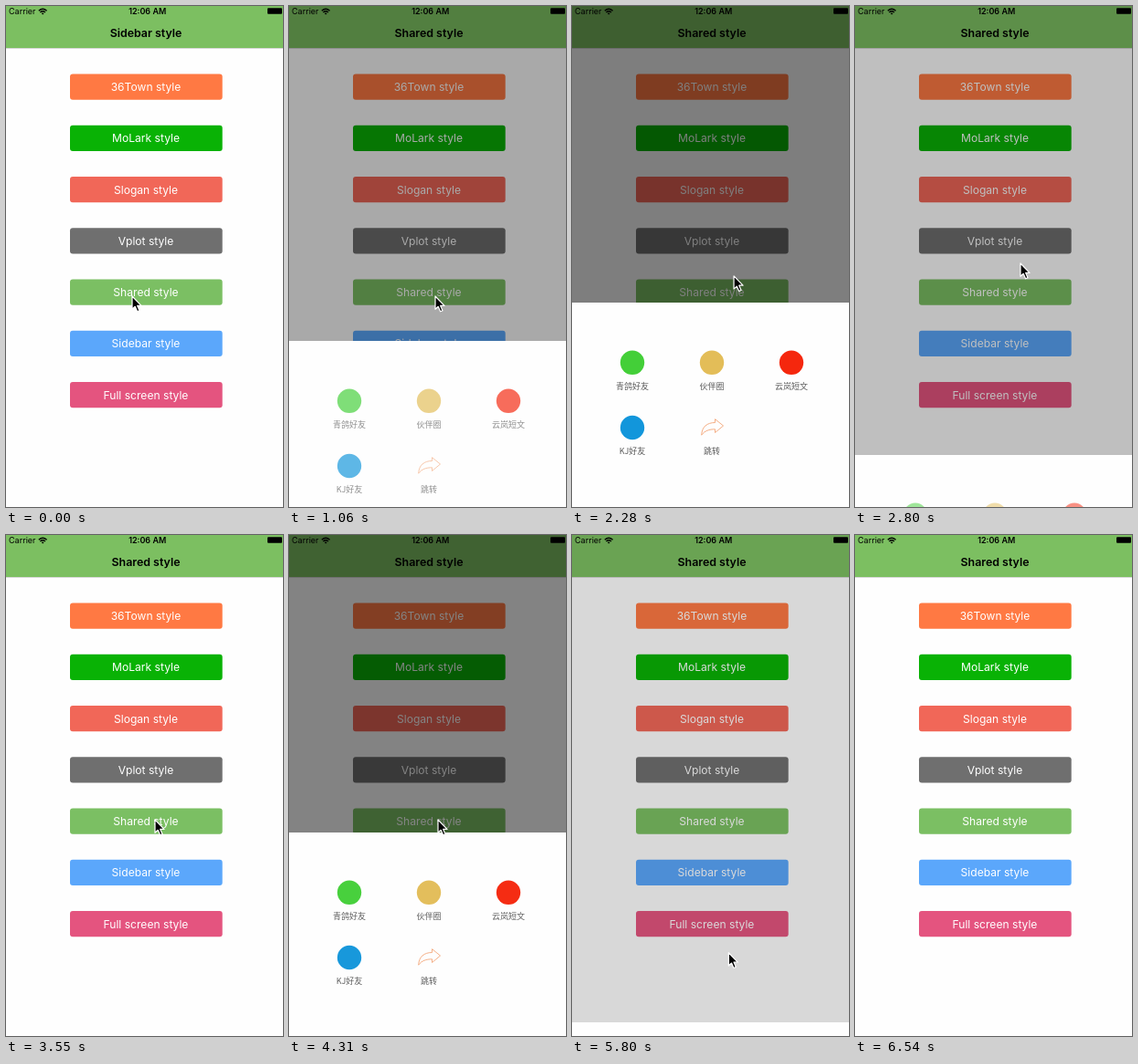
Write an HTML page that moves like this. It is 303 px wide and 549 px high and loops after 8040 ms.

```html
<!DOCTYPE html>
<html lang="en">
<head>
<meta charset="utf-8">
<title>Share sheet</title>
<style>
  html, body { margin: 0; width: 100%; height: 100%; overflow: hidden; background: #fefefe; }
  svg { display: block; width: 100%; height: 100%; }
  text { font-family: Inter, Roboto, sans-serif; text-anchor: middle; }
  .status { font-size: 9px; }
  .title { font-size: 12.4px; font-weight: 600; }
  .button { font-size: 12.1px; fill: #fff; }
  .label { font: 9px "Noto Sans CJK SC", "Noto Sans CJK", sans-serif; fill: #5a5a5a; }
</style>
</head>
<body>
<svg viewBox="0 0 303 549" preserveAspectRatio="none">
  <rect width="303" height="549" fill="#fefefe"/>
  <rect width="303" height="46" fill="#7cbf61"/>
  <rect y="46" width="303" height=".5" fill="#b2b2b2"/>
  <g id="buttons"></g>
  <rect id="dim" width="303" height="549"/>

  <text class="status" x="3" y="9" style="text-anchor:start">Carrier</text>
  <g fill="none" stroke="#000" stroke-width="1.3">
    <path d="M35.8 5.2Q40.2 1.2 44.6 5.2M37.4 7Q40.2 4.5 43 7"/>
    <path d="M40.2 9.6L38.7 8Q40.2 6.8 41.7 8Z" fill="#000" stroke="none"/>
  </g>
  <text class="status" x="154.7" y="9" font-weight="600">12:06 AM</text>
  <rect x="286" y="2.3" width="16" height="6.4" rx="1"/>
  <text class="title" id="title" x="153" y="34"></text>

  <g id="sheet">
    <rect width="303" height="225" fill="#fefefe"/>
    <g id="items"></g>
  </g>
  <path id="cursor" d="M0 0V14.3L3.2 11.3L5.6 16.8L8 15.7L5.7 10.4H10Z"
        stroke="#fff" stroke-width="1.2" stroke-linejoin="round"/>
</svg>
<script>
const LOOP = 8040, STEP = 57;
const SHEET_TOP = 325, SHEET_H = 224, GRAB_Y = 392;
const $ = id => document.getElementById(id);

function add(parent, tag, attrs, text) {
  const el = document.createElementNS('http://www.w3.org/2000/svg', tag);
  set(el, attrs);
  if (text) el.textContent = text;
  parent.append(el);
}

function set(el, attrs) {
  for (const k in attrs) el.setAttribute(k, attrs[k]);
}

[
  ['36Town', '#ff7943'],
  ['MoLark', '#09b205'],
  ['Slogan', '#f16758'],
  ['Vplot', '#6f6f6f'],
  ['Shared', '#7bbf63'],
  ['Sidebar', '#5ba7fb'],
  ['Full screen', '#e4547f']
].forEach(([name, fill], i) => {
  const y = 74.5 + i * 56.25;
  add($('buttons'), 'rect', { x: 70, y, width: 166.7, height: 28.3, rx: 3, fill });
  add($('buttons'), 'text', { class: 'button', x: 153, y: y + 18.6 }, name + ' style');
});

[
  ['青鸽好友', '#43cf38'],
  ['伙伴圈', '#e3bd58'],
  ['云岚短文', '#f5270d'],
  ['KJ好友', '#1296db'],
  ['跳转']
].forEach(([name, fill], i) => {
  const x = 66 + i % 3 * 87, y = 65.8 + (i > 2) * 71.2;
  if (fill) add($('items'), 'circle', { cx: x, cy: y, r: 13.2, fill });
  else add($('items'), 'path', {
    transform: `translate(${x} ${y})`,
    fill: 'none', stroke: '#f3a578', 'stroke-width': .9, 'stroke-linejoin': 'round',
    d: 'M12.5 -2L3.5 -9.3V-5.5C-5 -5.5 -11 -1 -11.3 8.2C-8 3.5 -3 1.8 3.5 1.8V5.5Z'
  });
  add($('items'), 'text', { class: 'label', x, y: y + 29 }, name);
});

// Pointer moves: each curves from the last place to `to`, bending towards `via`.
const moves = [
  { start: 300, end: 530, to: [160, 318] },
  { start: 1830, end: 2340, to: [181, 282], via: [161, 354] },
  { start: 3150, end: 3550, to: [163, 312] },
  { start: 4360, end: 4590, to: [157.5, GRAB_Y] },
  { start: 4890, end: 5170, to: [158, GRAB_Y + 48] },
  { start: 5400, end: 5460, to: [158, GRAB_Y + 57] },
  { start: 5630, end: 6430, to: [286, 533] }
];
moves[2].via = [221, 290];

// Progress from 0 to 1, drawn in steps of about STEP ms; the first step shows at `start`.
function progress(t, start, end) {
  if (t < start) return 0;
  if (t >= end) return 1;
  const n = Math.round((end - start) / STEP);
  return (Math.floor((t - start) / (end - start) * n) + 1) / (n + 1);
}

const smooth = p => p * p * (3 - 2 * p);

function pointer(t) {
  let at = [138, 318];
  for (const { start, end, to, via } of moves) {
    const p = smooth(progress(t, start, end)), q = 1 - p;
    at = at.map((a, i) => {
      const mid = via ? via[i] : (a + to[i]) / 2;
      return q * q * a + 2 * p * q * mid + p * p * to[i];
    });
  }
  return at;
}

// Each returns the sheet's distance below its rest place and the dim level.
function open(t, start) {
  const left = 1 - progress(t, start, start + 220);
  return [SHEET_H * left ** 3.3, 1 - left ** 2.2];
}

function close(t, start, from) {
  const left = 1 - progress(t, start, start + 220);
  return [SHEET_H - (SHEET_H - from) * left ** 1.5, left ** .75];
}

function sheet(t, y) {
  if (t < 2690) return open(t, 1000);
  if (t < 4140) return close(t, 2690, 0);
  if (t < 4890) return open(t, 4140);
  if (t < 5630) return [y - GRAB_Y, 1];
  return close(t, 5630, 57);
}

function draw(t) {
  const [x, y] = pointer(t);
  const [drop, level] = sheet(t, y);
  $('title').textContent = (t < 1000 ? 'Sidebar' : 'Shared') + ' style';
  set($('dim'), { opacity: level / 2 });
  set($('items'), { opacity: level });
  set($('sheet'), { transform: `translate(0 ${SHEET_TOP + Math.round(drop)})` });
  set($('cursor'), {
    transform: `translate(${x} ${y})`,
    visibility: t < 6540 ? 'visible' : 'hidden'
  });
}

const begin = performance.now();
function tick() {
  draw((performance.now() - begin) % LOOP);
  requestAnimationFrame(tick);
}
tick();
</script>
</body>
</html>
```
